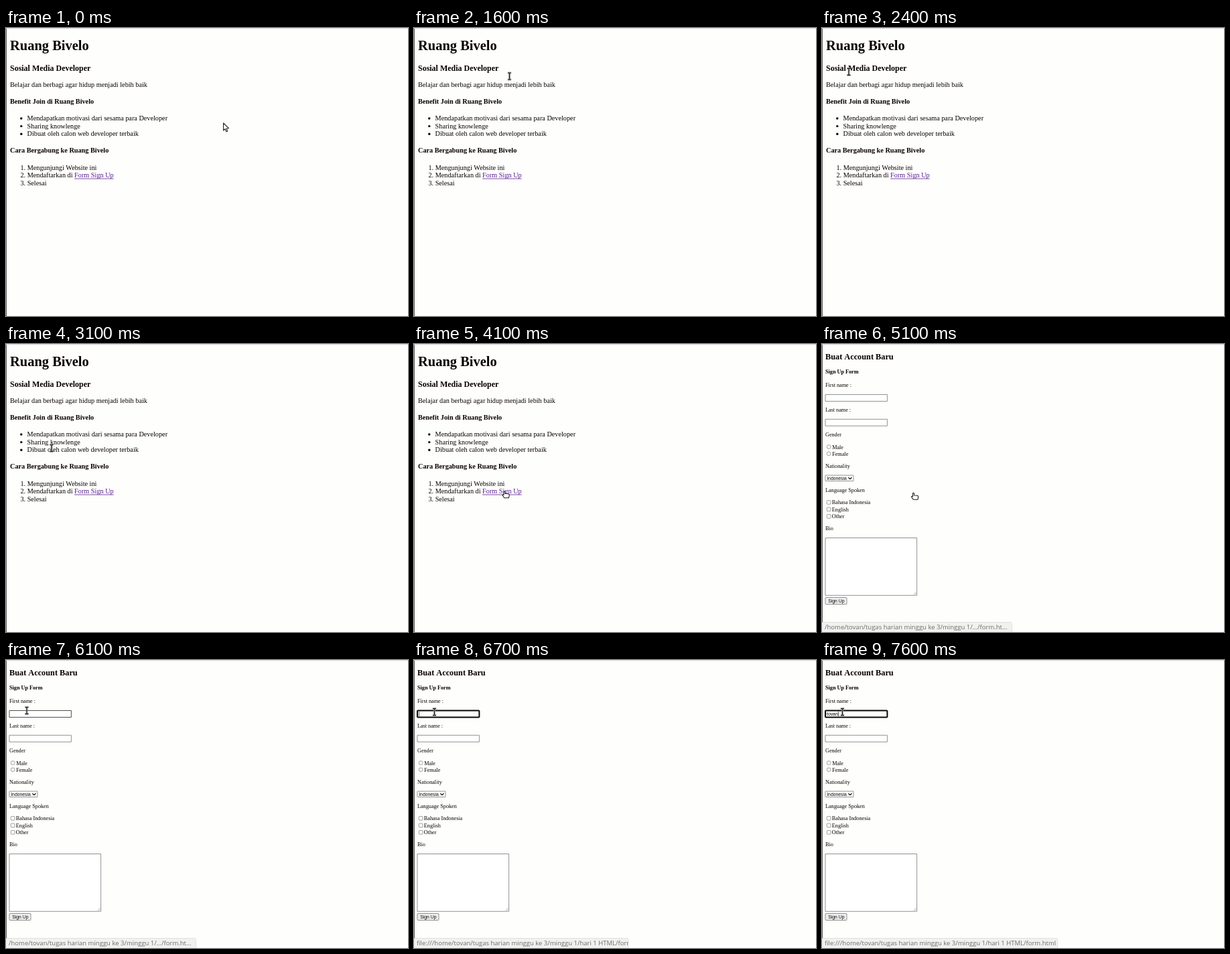
An HTML page with a canvas for the animation above (8000 ms loop, 600 px wide and 430 px high).

```html
<!DOCTYPE html>
<html lang="id">
<head>
<meta charset="utf-8">
<title>Sign Up</title>
<style>
  html, body { margin: 0; width: 100%; height: 100%; overflow: hidden; background: #fefefd; }
  canvas { display: block; }
</style>
</head>
<body>
<canvas id="stage" width="600" height="430"></canvas>
<script>
const ctx = document.getElementById('stage').getContext('2d');
const LOOP = 8000, STEP = 100;
const SERIF = '"Liberation Serif", serif';
const SANS = '"Liberation Sans", sans-serif';
const UI = '"Open Sans", sans-serif';
const SITE = 'Ruang Bivelo', USER = 'tovan';

const SHORT_PATH = `/home/${USER}/tugas harian minggu ke 3/minggu 1/…/form.ht…`;
const FULL_PATH = `file:///home/${USER}/tugas harian minggu ke 3/minggu 1/hari 1 HTML/form.html`;

// time, x, y, pointer kind
const POINTER = [
  [0, 324.5, 142, 'arrow'], [100, 230, 192, 'arrow'], [200, 72, 37, 'beam'],
  [300, 181.5, 98, 'beam'], [1500, 181.5, 98, 'beam'], [1600, 142.5, 72, 'beam'],
  [1800, 52, 23, 'beam'], [1900, 24, 27, 'beam'], [2000, 24, 27, 'beam'],
  [2100, 25, 26, 'beam'], [2900, 65, 131, 'beam'], [3100, 68, 155.5, 'beam'],
  [3500, 76, 188, 'beam'], [3800, 118.5, 206, 'beam'], [3900, 121, 208, 'beam'],
  [4000, 126, 212, 'hand'], [4100, 135, 219.5, 'hand'], [4200, 146, 221, 'hand'],
  [4400, 136.5, 222, 'hand'], [5500, 136.5, 222, 'hand'], [5600, 130, 208, 'arrow'],
  [6000, 45, 90, 'arrow'], [6100, 31, 75.5, 'beam'], [6200, 31, 75, 'beam'],
  [6300, 30.5, 77.5, 'beam']
];
const TYPING = [[6800, 1], [7100, 3], [7300, 4], [7600, 5]];

function text(str, x, y, size, { bold = false, family = SERIF, color = '#080000' } = {}) {
  ctx.font = `${bold ? 'bold ' : ''}${size}px ${family}`;
  ctx.fillStyle = color;
  ctx.fillText(str, x, y);
  return ctx.measureText(str).width;
}

function box(x, y, w, h, { r = 0, fill = '#fff', stroke = '#767676', line = 0.8 } = {}) {
  ctx.beginPath();
  ctx.roundRect(x, y, w, h, r);
  ctx.fillStyle = fill;
  ctx.fill();
  ctx.strokeStyle = stroke;
  ctx.lineWidth = line;
  ctx.stroke();
}

function polyline(points, color, width) {
  ctx.beginPath();
  points.forEach(([x, y]) => ctx.lineTo(x, y));
  ctx.strokeStyle = color;
  ctx.lineWidth = width;
  ctx.stroke();
}

function drawHome() {
  const size = 10.24, bold = { bold: true };
  text(SITE, 6, 33.3, 20.48, bold);
  text('Sosial Media Developer', 6, 63.5, 11.98, bold);
  text('Belajar dan berbagi agar hidup menjadi lebih baik', 6, 88, size);
  text(`Benefit Join di ${SITE}`, 6, 113, size, bold);
  ['Mendapatkan motivasi dari sesama para Developer', 'Sharing knowlenge',
    'Dibuat oleh calon web developer terbaik'].forEach((item, i) => {
    const y = 138 + i * 11.6;
    text(item, 31.6, y, size);
    ctx.beginPath();
    ctx.arc(22.8, y - 3, 1.7, 0, Math.PI * 2);
    ctx.fill();
  });
  text(`Cara Bergabung ke ${SITE}`, 6, 186.2, size, bold);
  ['Mengunjungi Website ini', 'Mendaftarkan di ', 'Selesai'].forEach((item, i) => {
    const y = 211.8 + i * 11.6;
    const end = 21.4 + text(`${i + 1}. ${item}`, 21.4, y, size);
    if (i === 1) {
      const width = text('Form Sign Up', end, y, size, { color: '#551a8b' });
      ctx.fillRect(end, y + 1.2, width, 0.8);
    }
  });
}

function drawForm(t) {
  const size = 8.19, small = { family: SANS };
  const label = (str, y, x = 5) => text(str, x, y, size);
  text('Buat Account Baru', 5, 22.5, 12.29, { bold: true });
  text('Sign Up Form', 5, 43.7, size, { bold: true });

  label('First name :', 64.2);
  const focused = t >= 6500;
  if (focused) {
    box(5, 75.5, 92.4, 10, { r: 1, stroke: '#080808', line: 2 });
    const stage = TYPING.filter(([start]) => t >= start).pop();
    const width = text(USER.slice(0, stage ? stage[1] : 0), 7, 83, 6.83, small);
    ctx.fillStyle = '#111';
    ctx.fillRect(7.2 + width, 77, 0.7, 7);
  } else {
    box(5, 75.5, 92.4, 10, { stroke: t >= 6100 ? '#222' : '#767676' });
  }
  label('Last name :', 101);
  box(5, 112.3, 92.4, 10);

  label('Gender', 138);
  ['Male', 'Female'].forEach((name, i) => {
    box(7.2, 150.7 + i * 10.2, 5.8, 5.8, { r: 2.9, line: 0.7 });
    label(name, 156.7 + i * 10.3, 15.2);
  });

  label('Nationality', 185);
  box(5, 196, 42, 8.6, { r: 0.5 });
  text('Indonesia', 7.2, 202.9, 6.83, small);
  polyline([[39.4, 199.2], [41.9, 201.7], [44.4, 199.2]], '#111', 1.3);

  label('Language Spoken', 220.8);
  ['Bahasa Indonesia', 'English', 'Other'].forEach((name, i) => {
    box(7.3, 233.6 + i * 10.5, 5.6, 5.6, { r: 0.8, line: 0.7 });
    label(name, 239.2 + i * 10.5, 14.8);
  });

  label('Bio', 278);
  box(5, 289.5, 136.6, 85.8);
  polyline([[136.8, 374], [140.4, 370.4]], '#777', 0.6);
  polyline([[139, 374], [140.4, 372.6]], '#777', 0.6);
  box(5, 378.5, 32, 10, { r: 1, fill: '#efefef' });
  text('Sign Up', 9.2, 386.1, 6.83, small);
}

function drawStatus(t) {
  if (t < 4600) return;
  ctx.globalAlpha = Math.min(1, (t - 4500) / 400);
  const width = t < 6700 ? 283.5 : t < 6800 ? 320 : 351.5;
  ctx.save();
  box(-4, 415.5, width + 4, 20, { r: 2, fill: '#f1f1ef', stroke: '#dcdcda' });
  ctx.clip();
  text(t < 6700 ? SHORT_PATH : FULL_PATH, 4, 426.2, 9.5, { family: UI, color: '#6c6c69' });
  ctx.restore();
  ctx.globalAlpha = 1;
}

const pointers = {
  arrow() {
    const shape = new Path2D('M0 0V11L2.6 8.7L4.4 12.7L6.2 11.9L4.5 8L7.9 7.7Z');
    ctx.fillStyle = '#fff';
    ctx.fill(shape);
    ctx.strokeStyle = '#222';
    ctx.lineWidth = 1.1;
    ctx.stroke(shape);
  },
  beam() {
    const shape = new Path2D('M-2.6 -5H2.6M-2.6 5H2.6M0 -5V5');
    ctx.strokeStyle = '#aaa';
    ctx.lineWidth = 2.8;
    ctx.stroke(shape);
    ctx.strokeStyle = '#222';
    ctx.lineWidth = 1.2;
    ctx.stroke(shape);
  },
  hand() {
    const shape = new Path2D('M-1 1Q0 -.5 1 1V4L5.5 4.3Q7.4 4.6 7.3 6L6.4 10.3H-.3L-3 6.3Q-3.3 4.8 -1 5.8Z');
    ctx.fillStyle = '#fff';
    ctx.fill(shape);
    ctx.strokeStyle = '#1c1c1c';
    ctx.lineWidth = 1.1;
    ctx.stroke(shape);
  }
};

function drawPointer(t) {
  let i = POINTER.length - 1;
  while (POINTER[i][0] > t) i--;
  const [start, x, y, kind] = POINTER[i];
  const [end, nextX, nextY] = POINTER[i + 1] || [LOOP, x, y];
  const k = (t - start) / (end - start);
  ctx.save();
  ctx.translate(x + (nextX - x) * k, y + (nextY - y) * k);
  ctx.lineJoin = 'round';
  pointers[kind]();
  ctx.restore();
}

function render(now) {
  const t = Math.floor((now % LOOP) / STEP) * STEP;
  ctx.fillStyle = '#fefefd';
  ctx.fillRect(0, 0, 600, 430);
  if (t < 5100) drawHome();
  else drawForm(t);
  ctx.fillStyle = '#dadada';
  ctx.fillRect(0, 0, 600, 1.3);
  ctx.fillStyle = '#655f5d';
  ctx.fillRect(0, 1, 1, 429);
  drawStatus(t);
  drawPointer(t);
}

const origin = performance.now();
function tick() {
  render(performance.now() - origin);
  requestAnimationFrame(tick);
}
tick();
</script>
</body>
</html>
```
